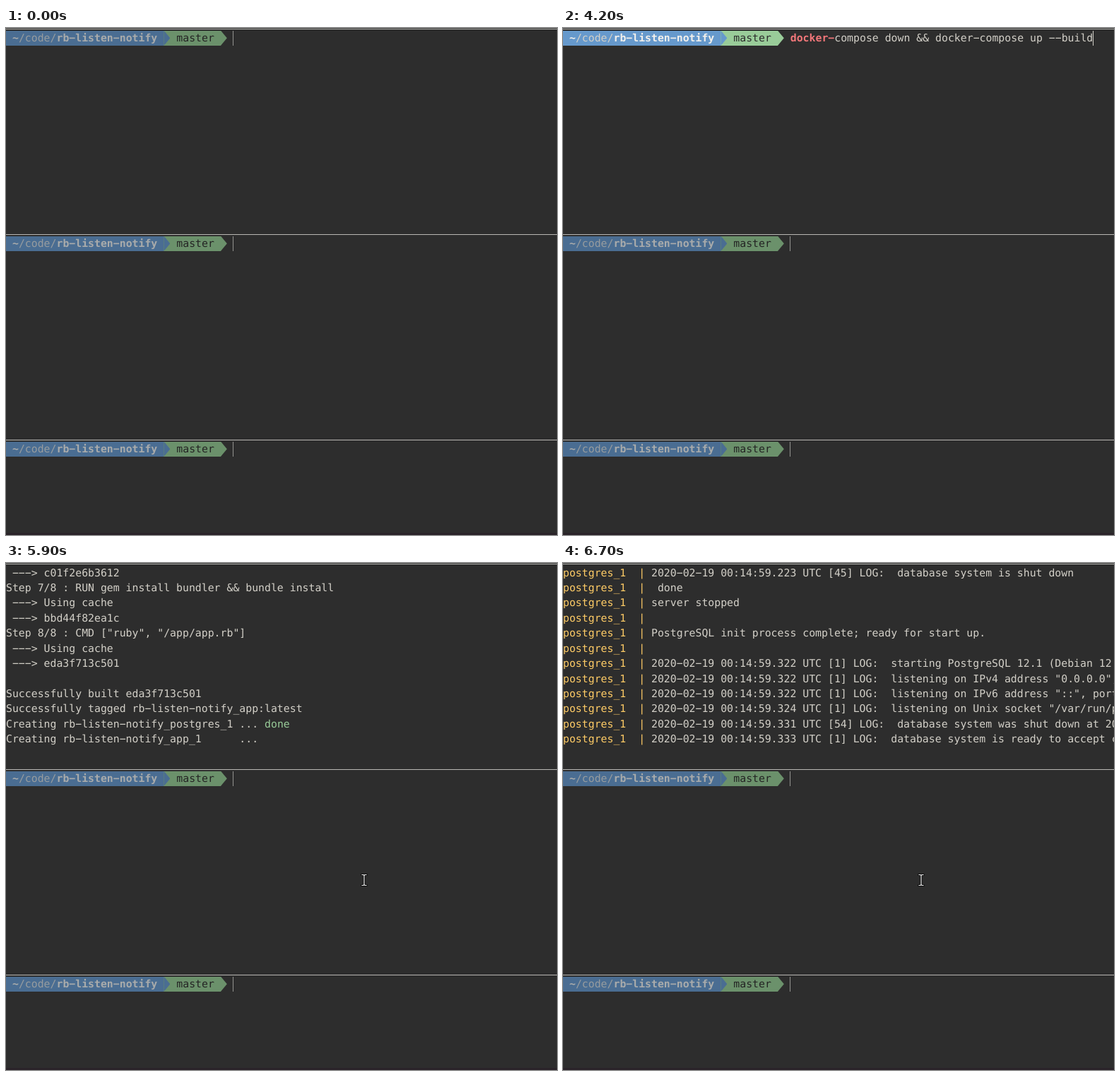
Write an HTML page that moves like this. It is 780x718 px and loops after 8 s.

```html
<!DOCTYPE html>
<html lang="en">
<head>
<meta charset="utf-8">
<title>Terminal panes</title>
<style>
  html, body { margin: 0; width: 100%; height: 100%; overflow: hidden; background: #2d2d2d; }
  body { position: relative; }
  .pane {
    --blue: #6699cc; --green: #99cc99; --plain: #d3d0c8; --strong: #f2f0ec; --ink: #2d2d2d;
    position: absolute; left: 0; width: 780px; height: 291px; overflow: hidden;
    border-top: 1px solid #b9b8b4; box-sizing: border-box;
    font: 14.845px/21.42px "DejaVu Sans Mono", monospace;
    text-rendering: geometricPrecision; font-variant-ligatures: none;
    white-space: pre; color: var(--plain);
  }
  .dim { --blue: #4a6d92; --green: #6b916b; --plain: #979c9f; --strong: #a9abab; --ink: #242424; }
  .row { position: absolute; left: 0; height: 21.42px; }
  .bar { position: absolute; left: 0; top: 1.6px; height: 21.42px; }
  .path, .branch, .tip { position: absolute; top: 0; height: 21.42px; }
  .path { left: 0; width: 223.44px; background: var(--blue); }
  .path b { color: var(--strong); }
  .branch { left: 223.44px; width: 80.1px; background: var(--green); color: var(--ink); text-indent: 8.94px; }
  .tip { width: 8.94px; clip-path: polygon(0 0, 100% 50%, 0 100%); }
  .tip.a { left: 223.44px; background: var(--blue); }
  .tip.b { left: 303.9px; background: var(--green); }
  .input { position: absolute; left: 321.75px; top: 0; }
  .caret { position: absolute; left: 321px; top: 0; width: 1px; height: 21px; background: #d3d0c8; }
  .dim .caret { background: #94938f; }
  .g { color: #99cc99; } .y { color: #ffcc66; } .l { color: #6699cc; }
  .r { color: #f2777a; font-weight: bold; } .s { color: #747369; }
  #edge { position: absolute; left: 0; top: 715px; width: 780px; height: 3px; background: #2a2329; }
  #mouse { position: absolute; left: -6px; top: -10px; }
</style>
</head>
<body>
<div class="pane" style="top:1px"></div>
<div class="pane dim" style="top:292px"></div>
<div class="pane dim" style="top:583px"></div>
<div id="edge"></div>
<svg id="mouse" width="12" height="20" fill="none" stroke-linecap="square">
  <path id="beam" d="M3 2.5H5L6 3.5L7 2.5H9M6 3.5V16.5M3 17.5H5L6 16.5L7 17.5H9" stroke="#111" stroke-width="3"/>
  <use href="#beam"/>
  <path d="M3 2.5H5L6 3.5L7 2.5H9M6 3.5V16.5M3 17.5H5L6 16.5L7 17.5H9" stroke="#eee" stroke-width="1.2"/>
</svg>
<script>
const LOOP = 8000, CHAR = 8.9375, LINE = 21.42, ROWS = 12;
const panes = document.querySelectorAll('.pane');
const mouse = document.getElementById('mouse');

// The terminal face has long hyphens; the minus sign has that shape.
const esc = s => s.replace(/&/g, '&amp;').replace(/</g, '&lt;').replace(/>/g, '&gt;').replace(/-/g, '\u2212');
const paint = (cls, s) => `<span class="${cls}">${esc(s)}</span>`;

function prompt(parts = [], caret = 0) {
  const text = parts.map(([cls, s]) => paint(cls, s)).join('');
  const bar = caret < 0 ? '' : `<i class="caret" style="left:${Math.floor(321.75 + caret * CHAR)}px"></i>`;
  return `<div class="bar"><div class="path"> <b>~</b>/code/<b>${esc('rb-listen-notify')}</b></div>` +
    `<div class="branch"> master</div><i class="tip a"></i><i class="tip b"></i>` +
    `<span class="input">${text}</span>${bar}</div>`;
}

// Output log
const app = 'rb-listen-notify_';
const removed = name => `Removing ${app}${name.padEnd(20)} ... done`;
const cached = (n, cmd, id) => [`Step ${n}/8 : ${cmd}`, ' ---> Using cache', ` ---> ${id}`];
const pg = s => `postgres_1  | ${s}`;
const log = (t, pid, s) => pg(`2020-02-19 00:14:59.${t} UTC [${pid}] LOG:  ${s}`);
const build = '(Debian 12.1-1.pgdg100+1) on x86_64-pc-linux-gnu';
const socket = 'listening on Unix socket "/var/run/postgresql/.s.PGSQL.5432"';
const wasDown = 'database system was shut down at 2020-02-19 00:14:58 UTC';
const ready = 'database system is ready to accept connections';

const lines = [], marks = {};
const add = (...more) => lines.push(...more);
const mark = name => marks[name] = lines.length;

add(...['a41be07d92c3', '0c8d5f31e7ba', '34ca5c3c15f5', '73f0fab94d27', '6dfe66ca0553', '2b712af60b6d',
  '96f28c1d4c6f', '8525d5c736c6', '58f2da729668', 'e882022caee6'].map(id => removed('app_run_' + id)),
  removed('app_1'), removed('postgres_1'));
mark('removing');
add(`Removing network ${app}default`, `Creating network "${app}default" with the default driver`);
mark('network');
add('Building app', 'Step 1/8 : FROM ruby:2.7', ' ---> 2ff4e698f315',
  ...cached(2, 'RUN apt-get update', '7d0e5b2c9a41'), ...cached(3, 'RUN mkdir /app', '91c3fa6d08be'));
mark('building');
add(...cached(4, 'WORKDIR /app', '5be8d7204fc6'), ...cached(5, 'COPY Gemfile /app/', 'e3a9107cd25f'),
  ...cached(6, 'COPY . /app', 'c01f2e6b3612'), ...cached(7, 'RUN gem install bundler && bundle install', 'bbd44f82ea1c'),
  ...cached(8, 'CMD ["ruby", "/app/app.rb"]', 'eda3f713c501'),
  '', 'Successfully built eda3f713c501', `Successfully tagged ${app}app:latest`);
mark('tagged');
add(`Creating ${app}postgres_1 ... done`, `Creating ${app}app_1      ...`);
mark('creating');
add(`Attaching to ${app}postgres_1, ${app}app_1`,
  pg('The files belonging to this database system will be owned by user "postgres".'),
  pg('This user must also own the server process.'), pg(''),
  pg('The database cluster will be initialized with locale "en_US.utf8".'),
  pg('The default database encoding has accordingly been set to "UTF8".'),
  pg('The default text search configuration will be set to "english".'), pg(''),
  pg('Data page checksums are disabled.'), pg(''));
mark('files');
add(pg('fixing permissions on existing directory /var/lib/postgresql/data ... ok'),
  pg('creating subdirectories ... ok'), pg('selecting dynamic shared memory implementation ... posix'),
  pg('selecting default max_connections ... 100'), pg('selecting default shared_buffers ... 128MB'),
  pg('selecting default time zone ... Etc/UTC'), pg('creating configuration files ... ok'),
  pg('running bootstrap script ... ok'), pg('performing post-bootstrap initialization ... ok'));
mark('init');
add(pg('ok'), pg(''), pg(''), pg('Success. You can now start the database server using:'), pg(''),
  pg('    pg_ctl -D /var/lib/postgresql/data -l logfile start'), pg(''),
  pg(`waiting for server to start....2020-02-19 00:14:59.120 UTC [45] LOG:  starting PostgreSQL 12.1 ${build}`),
  '6) 8.3.0, 64-bit', log(121, 45, socket), log(131, 46, wasDown), log(133, 45, ready));
mark('started');
add(pg(' done'), pg('server started'), pg('CREATE DATABASE'), pg(''), pg(''),
  pg('/usr/local/bin/docker-entrypoint.sh: ignoring /docker-entrypoint-initdb.d/*'), pg(''),
  pg('waiting for server to shut down....2020-02-19 00:14:59.216 UTC [45] LOG:  received fast shutdown request'),
  log(218, 45, 'aborting any active transactions'),
  log(220, 45, 'background worker "logical replication launcher" (PID 52) exited with exit code 1'),
  log(221, 47, 'shutting down'));
mark('stopping');
add(log(223, 45, 'database system is shut down'), pg(' done'), pg('server stopped'), pg(''),
  pg('PostgreSQL init process complete; ready for start up.'), pg(''),
  log(322, 1, `starting PostgreSQL 12.1 ${build}`),
  log(322, 1, 'listening on IPv4 address "0.0.0.0", port 5432'),
  log(322, 1, 'listening on IPv6 address "::", port 5432'),
  log(324, 1, socket), log(331, 54, wasDown), log(333, 1, ready));
mark('ready');

function tint(s) {
  const head = s.startsWith('postgres_1  |') ? 13 : 0;
  const tail = s.endsWith('... done') ? s.length - 4 : s.length;
  return paint('y', s.slice(0, head)) + esc(s.slice(head, tail)) + paint('g', s.slice(tail));
}
const output = name => lines.slice(marks[name] - ROWS, marks[name])
  .map((s, i) => `<div class="row" style="top:${1.6 + i * LINE}px">${tint(s)}</div>`).join('');

// Typed commands, with the shell's grey suggestion after the caret
const commit = 'git commit -m "Fix the tests"';
const compose = 'docker-compose down && docker-compose up --build';
const typed = (cls, n, full) => prompt([[cls, full.slice(0, n)], ['s', full.slice(n)]], n);
const accepted = n => prompt([['r', 'docker-'], ['', compose.slice(7, n)], ['s', compose.slice(n)]], n);
const gitAdd = prompt([['g', 'git '], ['y', 'add '], ['l', '.']], 9);
const entered = prompt([['g', 'docker-compose '], ['y', 'down '], ['', '&& '],
  ['g', 'docker-compose '], ['y', 'up --build']], -1);

const screens = [
  [0, prompt()], [900, typed('g', 4, commit)], [1500, gitAdd],
  [2000, typed('g', 4, commit)], [2100, prompt()],
  [2800, typed('y', 2, compose)], [3000, typed('r', 3, compose)], [3100, typed('r', 4, compose)],
  [3200, typed('r', 5, compose)], [3300, typed('g', 6, compose)], [3400, typed('r', 7, compose)],
  [4000, accepted(19)], [4100, accepted(37)], [4200, accepted(48)], [4700, entered],
  [5000, output('removing')], [5400, output('network')], [5500, output('building')],
  [5600, output('tagged')], [5900, output('creating')], [6300, output('files')],
  [6400, output('init')], [6500, output('started')], [6600, output('stopping')], [6700, output('ready')]
];
const pointer = [[0, null], [200, [716, 124]], [300, [640, 112]], [400, [560, 103]], [900, null],
  [5400, [552, 257]], [5500, [522, 385]], [5600, [507, 449]]];

const at = (list, t) => list.findLast(([start]) => t >= start)[1];
let shown;

function draw(t) {
  const screen = at(screens, t), pos = at(pointer, t);
  if (screen !== shown) panes[0].innerHTML = shown = screen;
  panes[0].classList.toggle('dim', t < 200);
  mouse.style.visibility = pos ? 'visible' : 'hidden';
  if (pos) mouse.style.transform = `translate(${pos[0]}px, ${pos[1]}px)`;
}

panes[1].innerHTML = panes[2].innerHTML = prompt();
const begin = performance.now();
function tick() {
  draw((performance.now() - begin) % LOOP);
  requestAnimationFrame(tick);
}
draw(0);
requestAnimationFrame(tick);
</script>
</body>
</html>
```
